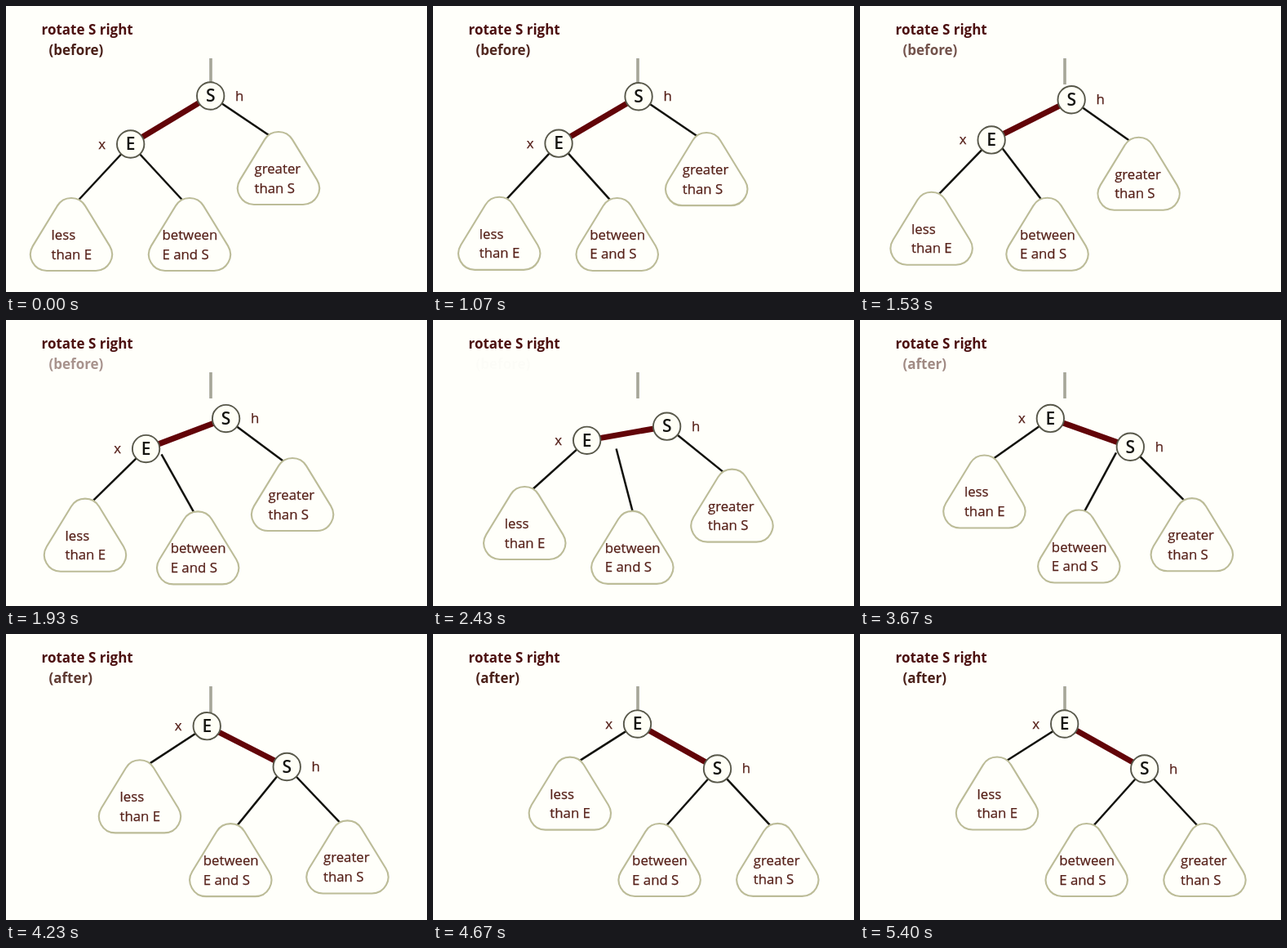
Animation of 516x350 px, one loop 5460 ms. Source, as an HTML page:

```html
<!DOCTYPE html>
<html lang="en">
<head>
<meta charset="utf-8">
<title>Rotate S right</title>
<style>
  html, body { margin: 0; width: 100%; height: 100%; overflow: hidden; background: #fffffa; }
  svg { display: block; width: 516px; height: 350px; }
  text { font: 16.8px "Open Sans", "Noto Sans", sans-serif; fill: #562019; stroke: #562019; stroke-width: 0.25; }
  .title { font-weight: bold; font-size: 17px; fill: #4c1010; stroke: none; }
  .sub { fill: #4a2018; }
  .key { font-size: 21px; font-weight: 600; fill: #141410; stroke: none; text-anchor: middle; }
  .mid { text-anchor: middle; }
  .link { stroke: #12120c; stroke-width: 2.5; }
  .red { stroke: #620408; stroke-width: 7; }
  .stem { stroke: #a6a698; stroke-width: 3.6; }
  .tree { fill: #fffffa; stroke: #bcbc98; stroke-width: 2.1; }
  .node { fill: #fffff6; stroke: #58584a; stroke-width: 1.9; }
</style>
</head>
<body>
<svg id="stage" viewBox="0 0 516 350">
  <text class="title" x="43.5" y="35">rotate S right</text>
  <text class="title sub" id="before" x="52.5" y="60">(before)</text>
  <text class="title sub" id="after" x="52.5" y="60">(after)</text>
  <line class="stem" x1="251" y1="64" x2="251" y2="96"/>
</svg>
<script>
const LOOP = 5460, START = 770, END = 4780;
const stage = document.getElementById("stage");

function add(parent, tag, attrs, text) {
  const el = document.createElementNS("http://www.w3.org/2000/svg", tag);
  for (const k in attrs) el.setAttribute(k, attrs[k]);
  if (text) el.textContent = text;
  return parent.appendChild(el);
}

const mix = (a, b, p) => [a[0] + (b[0] - a[0]) * p, a[1] + (b[1] - a[1]) * p];
const place = (el, [x, y]) => el.setAttribute("transform", `translate(${x.toFixed(2)} ${y.toFixed(2)})`);

function join(line, a, b) {
  line.setAttribute("x1", a[0]);
  line.setAttribute("y1", a[1]);
  line.setAttribute("x2", b[0]);
  line.setAttribute("y2", b[1]);
}

const links = [0, 1, 2].map(() => add(stage, "line", { class: "link" }));
const red = add(stage, "line", { class: "red" });

// Subtree origin: middle of its bottom edge
const OUTLINE = "M-17.1-79.4A20 20 0 0 1 17.1-79.4L47.1-30.4A20 20 0 0 1 30 0H-30A20 20 0 0 1-47.1-30.4Z";

function subtree(from, to, dx, top, bottom) {
  const el = add(stage, "g", {});
  add(el, "path", { class: "tree", d: OUTLINE });
  add(el, "text", { x: dx, y: -38 }, top);
  add(el, "text", { x: dx, y: -14.5 }, bottom);
  return { el, from, to };
}

function node(from, to, key, label, dx) {
  const el = add(stage, "g", {});
  add(el, "circle", { class: "node", r: 16.7 });
  add(el, "text", { class: "key", y: 7.3 }, key);
  add(el, "text", { class: "mid", x: dx, y: 5.5 }, label);
  return { el, from, to };
}

const less = subtree([80, 324], [168, 239.5], -24.5, "less", "than E");
const between = subtree([225, 324], [277.7, 321], -33.5, "between", "E and S");
const greater = subtree([334, 243], [422.5, 321], -29.5, "greater", "than S");
const e = node([152.7, 169], [250.7, 110], "E", "x", -35);
const s = node([250.7, 110], [348.7, 165], "S", "h", 35.5);
const parts = [less, between, greater, e, s];

const before = document.getElementById("before");
const after = document.getElementById("after");
const fade = p => Math.max(0, 1 - p / 0.37);
const apex = part => [part.at[0], part.at[1] - 77];

function draw(t) {
  const u = Math.min(1, Math.max(0, (t - START) / (END - START)));
  const p = (1 - Math.cos(Math.PI * u)) / 2;
  for (const part of parts) {
    part.at = mix(part.from, part.to, p);
    place(part.el, part.at);
  }
  // The middle link swings from E over to S
  const lift = Math.sin(Math.PI * p) ** 2;
  const hook = mix(e.from, s.to, p);
  hook[1] -= 12 * lift;
  const tip = apex(between);
  tip[0] += 4 * lift;

  join(red, e.at, s.at);
  join(links[0], e.at, apex(less));
  join(links[1], hook, tip);
  join(links[2], s.at, apex(greater));
  before.setAttribute("opacity", fade(p));
  after.setAttribute("opacity", fade(1 - p));
}

const origin = performance.now();
function tick() {
  draw((performance.now() - origin) % LOOP);
  requestAnimationFrame(tick);
}
draw(0);
requestAnimationFrame(tick);
</script>
</body>
</html>
```
